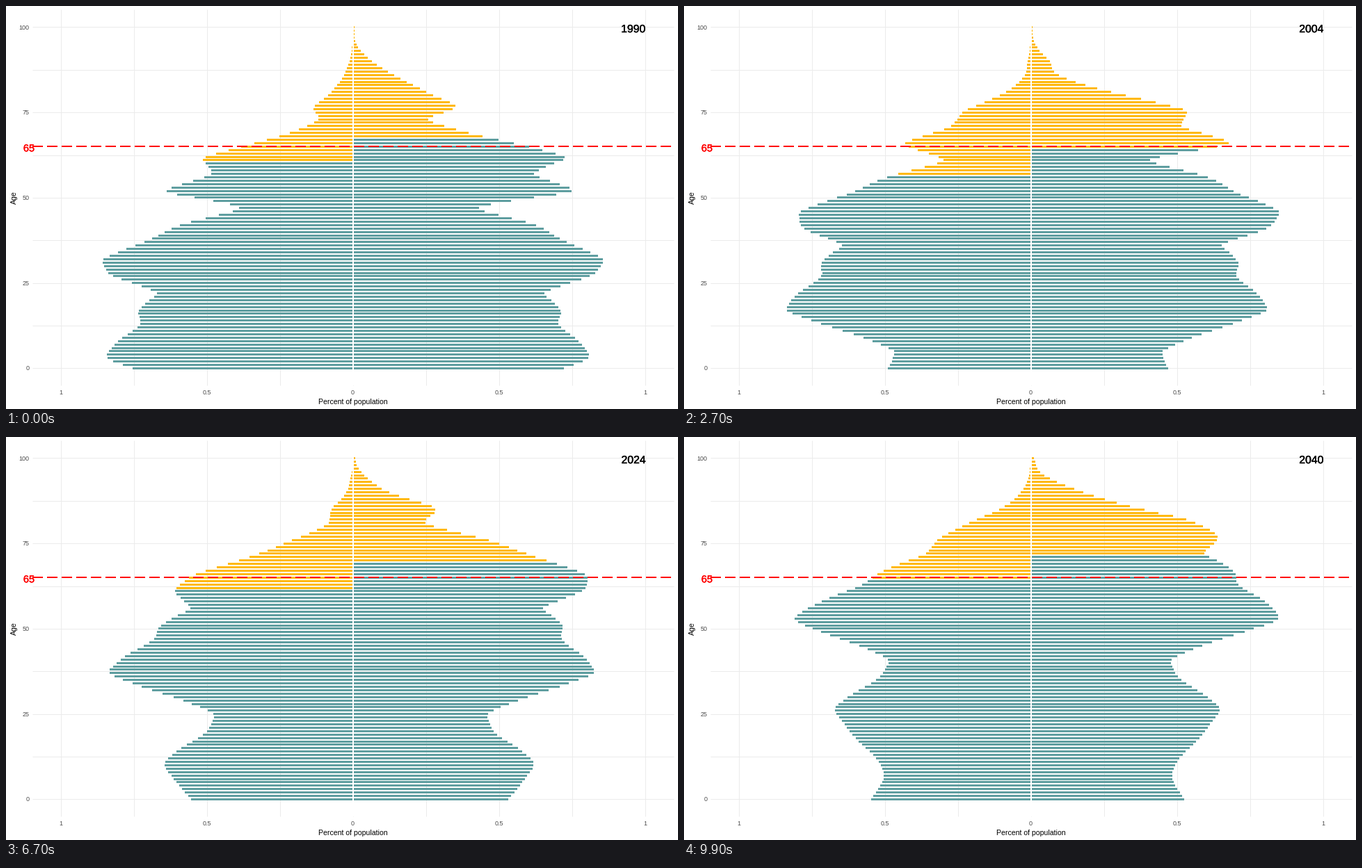
A matplotlib script for the animation above (10 s loop, 966 by 580 pixels).

```python
import numpy as np
import matplotlib.pyplot as plt
from matplotlib.animation import FuncAnimation
from matplotlib.collections import PolyCollection
from matplotlib.patheffects import withStroke

W, H, DPI = 966, 580, 100
PX = 72 / DPI
MID, UNIT = 498.5, 420
BASE, STEP, BAR = 521.5, 4.91, 3
LEFT, RIGHT, TOP, BOTTOM = 38, 960, 5, 546
TEAL, GOLD, GRID = "#5F9EA0", "#FFB90F", "#EBEBEB"
AGES = np.arange(101)

# turning points of the cohort sizes: birth year, bar length in pixels
COHORTS = [(1898, 440), (1902, 340), (1906, 288), (1910, 262), (1913, 262),
           (1917, 154), (1920, 190), (1926, 308), (1928, 335), (1931, 296),
           (1933, 274), (1936, 308), (1938, 323), (1940, 265), (1942, 200),
           (1943, 183), (1945, 210), (1947, 249), (1953, 307), (1956, 341),
           (1958, 359), (1960, 355), (1963, 339), (1966, 297), (1968, 274),
           (1970, 284), (1973, 297), (1977, 294), (1982, 323), (1985, 335),
           (1987, 337), (1990, 302), (1995, 230), (1997, 206), (1999, 188),
           (2001, 189), (2004, 196), (2010, 236), (2013, 251), (2018, 239),
           (2024, 216), (2028, 198), (2033, 188), (2040, 204)]

# working age limits of both sides
YEARS = [1990, 1996, 2004, 2017, 2040]
LIMITS = [61, 58, 57, 61, 65], [68, 66, 65, 69, 72]


def smooth(x, points):
    """Cubic Hermite curve through unevenly spaced points."""
    xp, fp = np.array(points, float).T
    x = np.clip(x, xp[0], xp[-1])
    m = np.gradient(fp, xp)
    i = np.clip(np.searchsorted(xp, x, side="right") - 1, 0, len(xp) - 2)
    h = xp[i + 1] - xp[i]
    t = (x - xp[i]) / h
    return ((1 + 2 * t) * (1 - t) ** 2 * fp[i] + t * (1 - t) ** 2 * h * m[i]
            + t * t * (3 - 2 * t) * fp[i + 1] + t * t * (t - 1) * h * m[i + 1])


def lengths(year):
    """Bar lengths by age: cohort size times Gompertz survival."""
    birth = year - AGES
    since = birth - 1938
    share = 1 + 0.07 * np.clip((year - 2015) / 25, 0, 1)
    size = smooth(birth, COHORTS) * share
    gain = np.exp(-0.007 * since) / (1 + (np.maximum(since, 0) / 55) ** 4)
    left_loss = 0.587 * np.exp((AGES - 65) / 14.3) * gain
    right_loss = 0.524 * np.exp((AGES - 79) / 9.6 - 0.013 * since)
    return 1.05 * size * np.exp(-left_loss), size * np.exp(-right_loss) + 2


def bars(year):
    verts, colors = [], []
    tops = np.round(BASE - STEP * AGES - BAR / 2)
    for sign, length, ages in zip((-1, 1), lengths(year), LIMITS):
        limit = int(np.interp(year, YEARS, ages) + 0.3)
        for age, x, y in zip(AGES, np.floor(MID + sign * length + 0.5), tops):
            verts.append([(MID, y), (x, y), (x, y + BAR), (MID, y + BAR)])
            colors.append(GOLD if age >= limit else TEAL)
    return verts, colors


fig = plt.figure(figsize=(W / DPI, H / DPI), dpi=DPI, facecolor="white")
ax = fig.add_axes([0, 0, 1, 1])
ax.set(xlim=(0, W), ylim=(H, 0))
ax.axis("off")


def label(x, y, s, px, color="#4D4D4D", **kw):
    kw = {"ha": "center", "va": "center", **kw}
    return ax.text(x, y, s, fontsize=px * PX, color=color,
                   family="Liberation Sans", zorder=6, **kw)


def heavy(color):
    return [withStroke(linewidth=0.3, foreground=color)]


# grid and axis labels
grid = dict(colors=GRID, linewidths=PX, zorder=1)
ax.vlines([np.floor(MID + UNIT * v / 4) + 0.5 for v in range(-4, 5)],
          TOP, BOTTOM, **grid)
ax.hlines([np.floor(BASE - 0.55 - STEP * v) + 0.5 for v in np.arange(0, 101, 12.5)],
          LEFT, RIGHT, **grid)
for v in range(0, 101, 25):
    label(33.5, BASE - STEP * v + 0.5, str(v), 9, ha="right")
for v in (-1, -0.5, 0, 0.5, 1):
    label(MID + UNIT * v, 556.5, f"{abs(v):g}", 9)
label(MID, 573, "Percent of population", 10.5, "black", va="baseline")
label(11.5, 276, "Age", 10.5, "black", rotation=90)

pyramid = PolyCollection([], antialiaseds=False, linewidths=0, zorder=2)
ax.add_collection(pyramid, autolim=False)
ax.fill_between([498, 500], TOP, BOTTOM, color="white", lw=0, zorder=3)
ax.plot([LEFT, RIGHT], [202, 202], color="red", lw=2 * PX, dashes=(7, 3),
        dash_capstyle="butt", antialiased=False, zorder=4)
label(33, 209.3, "65", 14.5, "red", va="baseline", path_effects=heavy("red"))
year_text = label(919.5, 38, "", 15.8, "black", ha="right", va="baseline",
                  path_effects=heavy("black"))


def update(i):
    year = 1990 + (i + 1) // 2
    verts, colors = bars(year)
    pyramid.set_verts(verts)
    pyramid.set_facecolor(colors)
    year_text.set_text(str(year))
    return pyramid, year_text


anim = FuncAnimation(fig, update, frames=100, interval=100, repeat=True,
                     repeat_delay=0, blit=False)
plt.show()
```
